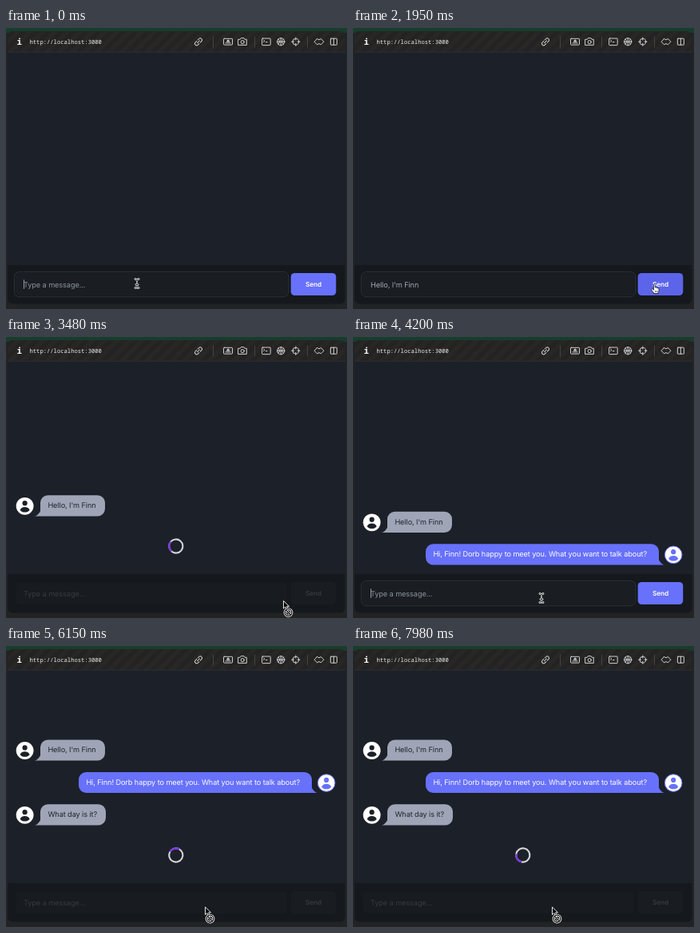
Recreate the animation shown at these times as an HTML page. Size 427x352 px, loop 8000 ms.

```html
<!DOCTYPE html>
<html lang="en">
<head>
<meta charset="utf-8">
<title>Chat demo</title>
<style>
  html, body { margin: 0; width: 100%; height: 100%; overflow: hidden; background: #222325; }
  svg { display: block; width: 427px; height: 352px; }
  text { font: 400 9.2px Inter, sans-serif; letter-spacing: -.1px; white-space: pre; text-rendering: geometricPrecision; }
  .url { font: 500 7.18px "Noto Sans Mono", monospace; letter-spacing: 0; fill: #ececec; }
  .info { font: 700 11px "Noto Sans Mono", monospace; fill: #f4f4f4; }
  .icons { fill: none; stroke: #d9d9d9; stroke-width: .95; stroke-linecap: round; stroke-linejoin: round; }
  .split { stroke: #464646; }
  #label { font-weight: 600; font-size: 8.3px; text-anchor: middle; }
</style>
</head>
<body>
<svg viewBox="0 0 427 352">
  <defs>
    <pattern id="stripes" width="11" height="11" patternUnits="userSpaceOnUse" patternTransform="rotate(45)">
      <rect width="11" height="11" fill="#232323"/>
      <rect width="5.5" height="11" fill="#282726"/>
    </pattern>
    <clipPath id="win"><rect x="2" y="4" width="422.5" height="341.5" rx="6"/></clipPath>

    <g id="person">
      <circle r="3.1" cy="-3.6"/>
      <path d="M-6 5.2C-5-.2 5-.2 6 5.2C3.4 8.6-3.4 8.6-6 5.2Z"/>
    </g>

    <path id="arrow" d="M0 0V9.6L2.3 7.5L3.8 11L5.6 10.2L4.1 6.9H7Z" fill="#000" stroke="#fff" stroke-width=".9" stroke-linejoin="round"/>
    <g id="banned">
      <use href="#arrow"/>
      <circle cx="6" cy="14.6" r="4.4" fill="#111" stroke="#fff" stroke-width="3"/>
      <path d="M2.9 11.5L9.1 17.7" stroke="#fff" stroke-width="2.6"/>
      <circle cx="6" cy="14.6" r="4.4" fill="none" stroke="#111" stroke-width="1.3"/>
      <path d="M2.9 11.5L9.1 17.7" stroke="#111" stroke-width="1.3"/>
    </g>
    <g id="ibeam" fill="none" stroke-linecap="round">
      <path id="beam" d="M-2.3-5.5Q0-5.5 0-4V4Q0 5.5-2.3 5.5M2.3-5.5Q0-5.5 0-4M0 4Q0 5.5 2.3 5.5M-1.3 1.4H1.3" stroke="#fff" stroke-width="2"/>
      <use href="#beam" style="stroke:#000"/>
      <path d="M-2.3-5.5Q0-5.5 0-4V4Q0 5.5-2.3 5.5M2.3-5.5Q0-5.5 0-4M0 4Q0 5.5 2.3 5.5M-1.3 1.4H1.3" stroke="#111" stroke-width=".8"/>
    </g>
    <g id="hand">
      <path d="M-.9.6Q0-.8.9.6V4Q1.9 3.4 2.6 4.4Q3.6 3.8 4.2 4.9Q5.4 4.5 5.6 6V8.2Q5.4 9.6 4.6 10.6V11.6H-.9V10.7Q-2.6 9-4 6.4Q-3.6 5-2.2 6L-.9 7.2Z" fill="#fff" stroke="#111" stroke-width=".8" stroke-linejoin="round"/>
      <path d="M.8 8V10M2.3 8V10M3.8 8V10" stroke="#111" stroke-width=".6"/>
    </g>
  </defs>

  <rect width="427" height="352" fill="#222325"/>
  <rect width="427" height="10" fill="#173d2d"/>
  <rect y="6" width="427" height="346" fill="#222325"/>
  <g clip-path="url(#win)">
    <rect y="4" width="427" height="26.5" fill="url(#stripes)"/>
    <rect y="30" width="427" height="267" fill="#1c2028"/>
    <rect y="297" width="427" height="49" fill="#15181c"/>
    <path d="M0 30.3H427" stroke="#34363a" stroke-width=".7"/>
  </g>

  <text class="info" x="13.6" y="21">i</text>
  <text class="url" x="29.5" y="19.8">http://localhost:3000</text>
  <g class="icons">
    <path class="split" d="M259.5 11V24M311.5 11V24M377.5 11V24"/>
    <g transform="translate(241 17.3) rotate(-45)">
      <path d="M-1-2.2H-3.2A2.2 2.2 0 0 0-3.2 2.2H-1M1-2.2H3.2A2.2 2.2 0 0 1 3.2 2.2H1M-2.2 0H2.2"/>
    </g>
    <rect x="272.5" y="13.3" width="11" height="7.8" rx=".8"/>
    <path d="M275 18.8H281M278 15L276.3 17H279.7Z" fill="#d9d9d9"/>
    <path d="M291 14.3H293.2L294.3 12.6H298L299.1 14.3H301.3V21.4H291Z"/>
    <circle cx="296.2" cy="17.6" r="2.1"/>
    <rect x="320.6" y="13" width="10.6" height="8.6" rx=".8"/>
    <path d="M322.6 15.2L324 16.3L322.6 17.4M325.3 17.6H327"/>
    <circle cx="344.2" cy="17.2" r="4.6"/>
    <path d="M344.2 12.6V21.8M339.6 17.2H348.8M341 14Q344.2 17.2 341 20.4M347.4 14Q344.2 17.2 347.4 20.4"/>
    <circle cx="362.8" cy="17.2" r="3.9"/>
    <path d="M362.8 12V15M362.8 19.4V22.4M357.6 17.2H360.6M365 17.2H368"/>
    <path d="M389.5 13.6Q392 16 394.5 13.6L396 15.2L398 17.2L396 19.2L394.5 20.8Q392 18.4 389.5 20.8L388 19.2L386 17.2L388 15.2Z"/>
    <rect x="406.4" y="13.2" width="8" height="8" rx=".6"/>
    <path d="M410.4 13.2V21.2"/>
  </g>

  <g id="chat"></g>
  <g id="spinner" fill="none" stroke-width="2.1">
    <circle r="8.6" stroke="#d3d5da"/>
    <path d="M-6.08-6.08A8.6 8.6 0 0 1 6.08-6.08" stroke="#7a2fe8"/>
  </g>

  <rect id="ring" x="10.4" y="305.4" width="343.4" height="31.4" rx="6.6" fill="none" stroke="#2e343b"/>
  <rect id="field" x="12.3" y="307.3" width="339.6" height="27.6" rx="4.8" stroke-width=".7"/>
  <text id="typed" x="22" y="324.6"></text>
  <rect id="caret" y="315.3" width=".8" height="11.5" fill="#b4bac6"/>
  <g id="button">
    <rect id="face" x="-28.3" y="-14.1" width="56.6" height="28.2" rx="4.8"/>
    <text id="label" y="3">Send</text>
  </g>
  <use id="pointer"/>
</svg>

<script>
const LOOP = 8000, BLINK = 190, SPIN = 1080;
const $ = id => document.getElementById(id);
const set = (el, attrs) => { for (const k in attrs) el.setAttribute(k, attrs[k]); };

const GREETING = "Hello, I'm Finn", QUESTION = "What day is it?";
const REPLY = "Hi, Finn! Dorb happy to meet you. What you want to talk about?";

// [time, visible characters of the message]
const firstKeys = [[0, 0], [90, 1], [150, 2], [210, 3], [240, 4], [480, 5], [540, 6], [600, 7],
  [660, 8], [720, 9], [780, 10], [870, 11], [1050, 10], [1080, 9], [1500, 10], [1530, 11],
  [1590, 12], [1650, 13], [1680, 14], [1740, 15]];
const secondKeys = [[4220, 0]];
for (let i = 0; i < QUESTION.length; i++) secondKeys.push([4770 + i * 45, i + 1]);

const SENT1 = 2100, ANSWER = 3600, FOCUS = 4140, BLUR = 5730, SENT2 = 5820;

// [time, x, y]
const path = [[0, 164, 320], [1620, 164, 320], [1860, 377.5, 321], [2130, 377.5, 321],
  [2250, 353, 324], [2500, 352, 332], [3060, 347.5, 330.5], [3840, 347.5, 330.5],
  [4080, 236, 327], [5460, 236, 327], [5550, 262, 333], [5670, 352, 322], [5730, 378, 316.5],
  [5850, 378, 316.5], [6120, 249.5, 327], [LOOP, 249.5, 327]];
const shapes = [[0, "ibeam"], [60, ""], [1620, "ibeam"], [1830, "hand"], [SENT1, "banned"],
  [3840, "ibeam"], [4770, ""], [5460, "ibeam"], [5676, "hand"], [5745, "arrow"], [5850, "banned"]];

const lastStep = (table, t) => table.reduce((hit, row) => row[0] <= t ? row : hit, table[0]);

function pointAt(t) {
  const i = path.findIndex(p => p[0] > t), [t0, x0, y0] = path[i - 1], [t1, x1, y1] = path[i];
  const k = (t - t0) / (t1 - t0), e = k * k * (3 - 2 * k);
  return [x0 + (x1 - x0) * e, y0 + (y1 - y0) * e];
}

function message(text, width, mine) {
  const g = document.createElementNS("http://www.w3.org/2000/svg", "g");
  const x = mine ? 43 : 91, r = 9.4, h = 26.2, w = width;
  // bubble and tail, drawn with the tail at the left and mirrored for replies
  const shape = `M-7 ${h}C-4.7 ${h} 0 ${h - 4.7} 0 ${h - 7}V${r}A${r} ${r} 0 0 1 ${r} 0H${w - r}` +
    `A${r} ${r} 0 0 1 ${w} ${r}V${h - r}A${r} ${r} 0 0 1 ${w - r} ${h}Z`;
  const flip = mine ? `translate(${x})` : `translate(${x + w}) scale(-1 1)`;
  const blue = "#6771fb";
  g.innerHTML = `<path d="${shape}" transform="${flip}" fill="${mine ? "#9fa5b6" : blue}"/>
    <text x="${x + 9.4}" y="16" fill="${mine ? "#1f242d" : "#fff"}">${text}</text>
    <g transform="translate(${mine ? 23.6 : 401.2} 13.6)">
      <circle r="${mine ? 10.9 : 10.8}" fill="#fff" stroke="${mine ? "none" : blue}"/>
      <use href="#person" fill="${mine ? "#1c2028" : blue}"/>
    </g>`;
  $("chat").append(g);
  return g;
}
const messages = [message(GREETING, 81, true), message(REPLY, 292, false), message(QUESTION, 82, true)];

function topsAt(t) {
  if (t < SENT1) return [];
  if (t < ANSWER) return [198.2];
  if (t < SENT2) return [218.7, 259.2];
  return [117.4, 157.9, 198.2];
}

function draw(t) {
  const tops = topsAt(t);
  messages.forEach((m, i) => set(m, i < tops.length
    ? { visibility: "visible", transform: `translate(0 ${tops[i]})` }
    : { visibility: "hidden" }));

  const busy = t >= SENT1 && t < ANSWER || t >= SENT2;
  const angle = t < ANSWER ? 265 + (t - 3480) / SPIN * 360 : -15 + (t - 6150) / SPIN * 360;
  set($("spinner"), { visibility: busy ? "visible" : "hidden", transform: `translate(212.8 262) rotate(${angle})` });

  const second = t >= SENT1;
  const focused = t < 2040 || t >= FOCUS && t < BLUR;
  const [since, count] = lastStep(second ? secondKeys : firstKeys, t);
  const value = busy ? "" : (second ? QUESTION : GREETING).slice(0, count);
  const typed = $("typed");
  typed.textContent = value || "Type a message...";
  set(typed, { fill: busy ? "#373b42" : value ? "#a1a8b4" : "#8b929d" });
  const lit = focused && Math.floor(Math.max(0, t - since) / BLINK) % 2 === 0;
  set($("caret"), {
    visibility: lit ? "visible" : "hidden",
    x: 22 + (value ? typed.getComputedTextLength() + .3 : 0)
  });

  set($("ring"), { visibility: focused ? "visible" : "hidden" });
  set($("field"), busy ? { fill: "#181b20", stroke: "#181b20" }
    : { fill: "#1a1e23", stroke: focused ? "#1e2328" : "#2c3238" });

  const [x, y] = pointAt(t), shape = lastStep(shapes, t)[1];
  const hover = !busy && shape && x > 357;
  const pressed = t >= 2040 && t < SENT1 || t >= BLUR && t < SENT2;
  set($("button"), { transform: `translate(385 321) scale(${pressed ? .97 : 1})` });
  set($("face"), { fill: busy ? "#191c20" : hover ? "#5c65ea" : "#6771fb" });
  set($("label"), { fill: busy ? "#363a40" : "#fff" });

  set($("pointer"), {
    href: shape ? "#" + shape : "",
    visibility: shape ? "visible" : "hidden",
    transform: `translate(${x} ${y})`
  });
}

function tick() {
  draw(performance.now() % LOOP);
  requestAnimationFrame(tick);
}
tick();
</script>
</body>
</html>
```
